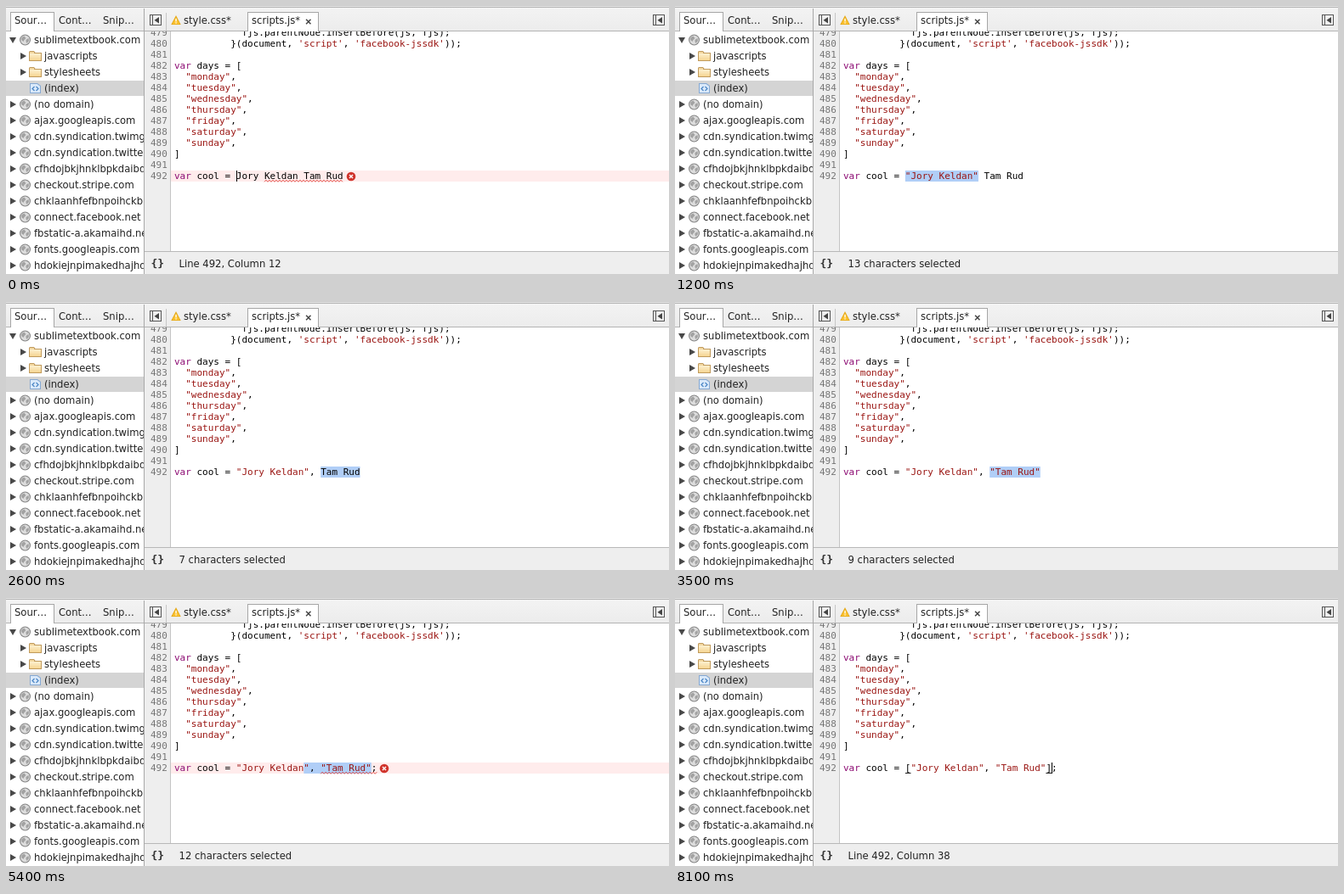
An HTML page with a canvas that plays this animation: 780 by 316 pixels, repeating every 8200 ms.

```html
<!DOCTYPE html>
<html lang="en">
<head>
<meta charset="utf-8">
<title>Editing an array in the sources panel</title>
<style>
  html, body { margin: 0; width: 100%; height: 100%; overflow: hidden; background: #fff; }
  canvas { display: block; width: 780px; height: 316px; }
</style>
</head>
<body>
<canvas id="stage"></canvas>
<script>
const W = 780, H = 316, LOOP = 8200;
const canvas = document.getElementById('stage');
const ctx = canvas.getContext('2d');
const dpr = window.devicePixelRatio || 1;
canvas.width = W * dpr;
canvas.height = H * dpr;
ctx.scale(dpr, dpr);

const UI = '11.6px "DejaVu Sans", sans-serif';
const MONO = '11px "DejaVu Sans Mono", monospace';
const CODE_X = 198, LINE_H = 13, LAST = 492, LAST_Y = 204;
const BAR_Y = 29, STATUS_Y = 289;
ctx.font = MONO;
const CHAR = ctx.measureText('0').width;
const colX = col => CODE_X + col * CHAR;

const domains = [
  '(no domain)', 'ajax.googleapis.com', 'cdn.syndication.twimg.com',
  'cdn.syndication.twitter.com', 'cfhdojbkjhnklbpkdaibdccddilifddb',
  'checkout.stripe.com', 'chklaanhfefbnpoihckbnefhakgolnmc',
  'connect.facebook.net', 'fbstatic-a.akamaihd.net',
  'fonts.googleapis.com', 'hdokiejnpimakedhajhdlcegeplioahd'
];
const days = ['monday', 'tuesday', 'wednesday', 'thursday', 'friday', 'saturday', 'sunday'];
const code = [
  ' '.repeat(12) + 'fjs.parentNode.insertBefore(js, fjs);',
  ' '.repeat(10) + "}(document, 'script', 'facebook-jssdk'));",
  '', 'var days = [', ...days.map(d => `  "${d}",`), ']', ''
];

const A = 'Jory Keldan', B = 'Tam Rud', V = 'var cool = ';
const bare = `${V}${A} ${B}`;
const one = `${V}"${A}" ${B}`;
const comma = `${V}"${A}", ${B}`;
const both = `${V}"${A}", "${B}"`;
const ended = both + ';';
const list = `${V}["${A}", "${B}"];`;

// start time, text, selection from, selection to, first column of the error (0: none)
const steps = [
  [0, bare, 11, 11, 16],
  [300, bare, 11, 15, 16],
  [600, bare, 11, 22, 16],
  [1000, one, 11, 24, 0],
  [1500, one, 24, 24, 0],
  [1800, comma, 25, 25, 0],
  [2100, comma, 26, 26, 0],
  [2300, comma, 26, 29, 0],
  [2500, comma, 26, 33, 0],
  [3000, both, 26, 35, 0],
  [4100, both, 35, 35, 0],
  [4300, ended, 36, 36, 0],
  [4500, ended, 35, 35, 0],
  [4800, ended, 31, 35, 0],
  [5100, ended, 27, 35, 26],
  [5400, ended, 23, 35, 26],
  [5600, ended, 17, 35, 26],
  [5700, ended, 12, 35, 26],
  [6200, ended, 11, 35, 26],
  [7100, list, 11, 37, 0],
  [7500, list, 37, 37, 0]
];

function rect(x, y, w, h, color) {
  ctx.fillStyle = color;
  ctx.fillRect(x, y, w, h);
}

function text(str, x, y, color = '#222', font = UI) {
  ctx.font = font;
  ctx.fillStyle = color;
  ctx.fillText(str, x, y);
}

function shape(points, color) {
  ctx.beginPath();
  points.forEach(([x, y]) => ctx.lineTo(x, y));
  ctx.closePath();
  ctx.fillStyle = color;
  ctx.fill();
}

function stroke(points, color, width = 1) {
  ctx.beginPath();
  points.forEach(([x, y]) => ctx.lineTo(x, y));
  ctx.strokeStyle = color;
  ctx.lineWidth = width;
  ctx.stroke();
}

function disc(x, y, r, color) {
  ctx.beginPath();
  ctx.arc(x, y, r, 0, Math.PI * 2);
  ctx.fillStyle = color;
  ctx.fill();
}

function gradient(y0, y1, from, to) {
  const g = ctx.createLinearGradient(0, y0, 0, y1);
  g.addColorStop(0, from);
  g.addColorStop(1, to);
  return g;
}

function cross(x, y, r, color, width) {
  stroke([[x - r, y - r], [x + r, y + r]], color, width);
  stroke([[x - r, y + r], [x + r, y - r]], color, width);
}

function arrow(x, y, open) {
  shape(open ? [[x - 4, y - 3], [x + 4, y - 3], [x, y + 4]]
             : [[x - 3, y - 4], [x + 4, y], [x - 3, y + 4]], '#484848');
}

function globe(x, y) {
  disc(x, y, 6.5, '#858585');
  disc(x, y, 5.4, '#dcdcdc');
  shape([[x - 4, y - 3], [x - 1, y - 4.5], [x + 1, y - 2], [x - 1, y], [x - 2, y + 2], [x - 4.5, y]], '#a2a2a2');
  shape([[x + 1, y], [x + 4, y - 2], [x + 4.5, y + 1], [x + 2, y + 4], [x + 1, y + 2]], '#a2a2a2');
}

function folder(x, y) {
  shape([[x, y - 5], [x + 1, y - 6], [x + 6, y - 6], [x + 7.5, y - 4], [x + 15, y - 4], [x + 15, y + 6], [x, y + 6]], '#c09a5c');
  rect(x + 1, y - 3, 13, 8, gradient(y - 3, y + 5, '#fdf0cf', '#f5d592'));
  rect(x + 1, y - 5, 5, 2, '#f3d8a0');
}

function page(x, y) {
  shape([[x, y - 6], [x + 9, y - 6], [x + 13, y - 3], [x + 13, y + 6], [x, y + 6]], '#86a9d3');
  shape([[x + 1, y - 5], [x + 8.5, y - 5], [x + 12, y - 2.5], [x + 12, y + 5], [x + 1, y + 5]], '#dbeafa');
  stroke([[x + 5.5, y - 2], [x + 3, y + .5], [x + 5.5, y + 3]], '#4b86c6', 1.2);
  stroke([[x + 7.5, y - 2], [x + 10, y + .5], [x + 7.5, y + 3]], '#4b86c6', 1.2);
}

function panelIcon(x) {
  ctx.strokeStyle = '#555';
  ctx.lineWidth = 1;
  ctx.strokeRect(x + .5, 10.5, 13, 12);
  rect(x + 3, 11, 1, 12, '#555');
  shape([[x + 11, 13], [x + 11, 20.5], [x + 5.5, 16.75]], '#444');
}

function tab(x, w) {
  rect(x, 7, w, BAR_Y - 6, '#a6a6a6');
  rect(x + 1, 8, w - 2, BAR_Y - 7, '#fff');
}

function drawSidebar() {
  ctx.save();
  ctx.beginPath();
  ctx.rect(0, 0, 162, H);
  ctx.clip();
  tab(5, 52);
  text('Sour…', 10, 21);
  text('Cont…', 62, 21);
  text('Snip…', 114, 21);

  rect(0, 88, 162, 18, '#d4d4d4');
  const rowY = i => 40 + i * 19;
  arrow(8, rowY(0), true);
  globe(22.5, rowY(0));
  text('sublimetextbook.com', 33, rowY(0) + 4);
  ['javascripts', 'stylesheets'].forEach((name, i) => {
    const y = rowY(i + 1);
    arrow(20, y);
    folder(27, y);
    text(name, 45, y + 4);
  });
  page(28, rowY(3));
  text('(index)', 45, rowY(3) + 4);
  domains.forEach((name, i) => {
    const y = rowY(i + 4);
    arrow(8, y);
    globe(22.5, y);
    text(name, 33, y + 4);
  });
  ctx.restore();
  rect(162, 3, 1, H - 3, '#a8a8a8');
}

function drawTabs() {
  rect(0, 0, W, 1, '#e4e4e4');
  rect(0, 1, W, 1, '#b4b4b4');
  rect(0, 2, W, BAR_Y - 2, gradient(2, BAR_Y, '#f3f3f3', '#ececec'));
  rect(0, BAR_Y, W, 1, '#b3b3b3');
}

function drawFileTabs() {
  panelIcon(169);
  rect(188, 8, 1, BAR_Y - 8, '#c6c6c6');
  shape([[200, 11], [205.7, 22], [194.3, 22]], '#e5a818');
  shape([[200, 13.2], [204.2, 21.2], [195.8, 21.2]], '#fbc22f');
  rect(199.4, 14.8, 1.3, 3.6, '#fff');
  rect(199.4, 19.3, 1.3, 1.3, '#fff');
  text('style.css*', 209, 21);
  tab(284, 84);
  text('scripts.js*', 289, 21);
  cross(355.8, 18.5, 2.7, '#444', 1.5);
  panelIcon(761);
}

function drawCode(str, y) {
  let x = CODE_X;
  for (const part of str.match(/"[^"]*"|'[^']*'|\bvar\b|[^"'v]+|./g) || []) {
    const color = /^["']/.test(part) ? '#9a1512' : part === 'var' ? '#8c0a72' : '#000';
    text(part, x, y, color, MONO);
    x += part.length * CHAR;
  }
}

function drawLine(str, num) {
  const y = LAST_Y + (num - LAST) * LINE_H;
  text(String(num), 170, y, '#757575', MONO);
  drawCode(str, y);
}

function drawError(from, end) {
  const points = [];
  for (let x = colX(from); x <= colX(end); x++) {
    points.push([x, 206.3 + Math.abs((x - colX(from)) % 4 - 2) - 1]);
  }
  stroke(points, '#e0342c', 1);
  const x = Math.round(colX(end) + 9);
  disc(x, 201, 5.3, '#d0342c');
  cross(x, 201, 2, '#fff', 1.4);
}

function draw(t) {
  const [start, str, from, to, error] = steps.filter(s => s[0] <= t).pop();
  rect(0, 0, W, H, '#fff');
  drawTabs();
  drawSidebar();

  ctx.save();
  ctx.beginPath();
  ctx.rect(163, BAR_Y + 1, W - 163, STATUS_Y - BAR_Y - 1);
  ctx.clip();
  rect(163, BAR_Y, 30, STATUS_Y - BAR_Y, '#eee');
  rect(193, BAR_Y, 1, STATUS_Y - BAR_Y, '#c4c4c4');
  if (error) rect(194, 194, W - 194, 13, '#ffecec');
  if (to > from) rect(colX(from), 194, (to - from) * CHAR, 13, '#b0cef7');
  code.forEach((line, i) => drawLine(line, 479 + i));
  drawLine(str, LAST);
  if (error) drawError(error, str.length);
  if (from === to) rect(Math.round(colX(from)), 194, 1, 13, '#000');
  if (start === 7500) {
    for (const col of [11, 36]) rect(colX(col), 206, CHAR, 1, '#222');
  }
  ctx.restore();

  drawFileTabs();
  rect(163, STATUS_Y, W - 163, H - STATUS_Y, '#eee');
  rect(163, STATUS_Y, W - 163, 1, '#b8b8b8');
  text('{}', 170.5, 308, '#333', 'bold 13px "DejaVu Sans Mono", monospace');
  const status = to > from ? `${to - from} characters selected` : `Line ${LAST}, Column ${to + 1}`;
  text(status, 203.5, 308);
}

function tick(now) {
  draw(now % LOOP);
  requestAnimationFrame(tick);
}
draw(0);
requestAnimationFrame(tick);
</script>
</body>
</html>
```
